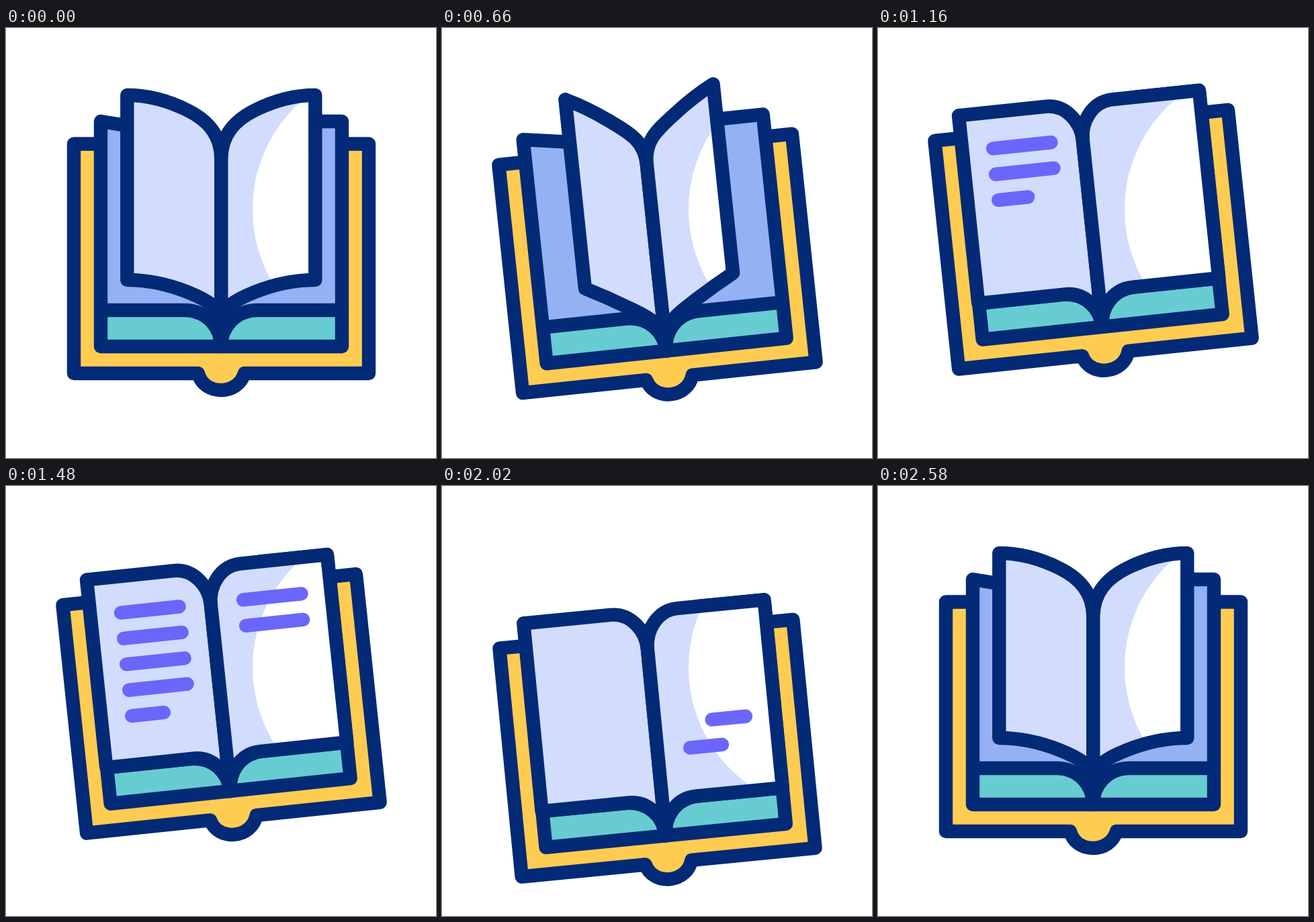
Write an HTML page with a canvas that moves like this. It is 640 px wide and 640 px high and loops after 2.62 s.

```html
<!DOCTYPE html>
<html lang="en">
<head>
<meta charset="utf-8">
<title>Open book</title>
<style>
  html, body { margin: 0; width: 100%; height: 100%; overflow: hidden; background: #fff; }
  canvas { display: block; width: 640px; height: 640px; }
</style>
</head>
<body>
<canvas id="stage" width="640" height="640"></canvas>
<script>
const ctx = document.getElementById('stage').getContext('2d');
const LOOP = 2620;
const SPINE = 320.3, MID = 343, BEND = 50;
const NAVY = '#032a76', GOLD = '#ffcc52', TEAL = '#67ccd1';
const BLUE = '#94b1f3', PAPER = '#d2dcfd', INK = '#6a66fa';

// [time, value] pairs, eased in and out between neighbours
const drop = [[150, 0], [400, 48], [900, -28.5], [1270, -28.5], [1870, 4], [2020, 47], [2420, 0]];
const tilt = [[150, 0], [420, -6], [1940, -6], [2443, 0]];

// Half page: width, then [corner y, bend y, slope at the bend, spine y] of both edges
const raised = [140, [100, 122.5, 0.5, 195], [375, 393, 0.4, 440]];
const upright = [110, [86, 124, 0.75, 195], [369, 404, 0.62, 465]];
const flat = [180, [139, 139, 0, 195], [420, 420, 0, 474]];
const poses = [[420, raised], [685, upright], [930, flat], [2060, flat], [2360, upright], [2580, raised]];

const clamp = x => Math.min(1, Math.max(0, x));
const ease = x => x * x * (3 - 2 * x);
const mix = (a, b, p) => Array.isArray(a) ? a.map((v, i) => mix(v, b[i], p)) : a + (b - a) * p;

function track(keys, t) {
  let value = keys[0][1];
  for (let i = 1; i < keys.length; i++) {
    const [t0, from] = keys[i - 1], [t1, to] = keys[i];
    if (t > t0) value = mix(from, to, ease(clamp((t - t0) / (t1 - t0))));
  }
  return value;
}

function shape(d, fill) {
  const path = new Path2D(d);
  if (fill) {
    ctx.fillStyle = fill;
    ctx.fill(path);
  }
  ctx.stroke(path);
}

function cover() {
  shape('M101 172.5H540V514H355C350 530 336 539 320 539S290 530 286 514H101Z', GOLD);
}

function backPages() {
  ctx.fillStyle = TEAL;
  ctx.fillRect(141, 400, 359, 74);
  shape('M141 139L260 158L320 200V474C320 447 300 420 265 420H141Z', BLUE);
  shape('M500 139H400L320 200V474C320 447 340 420 375 420H500Z', BLUE);
  shape('M141 420V474H500V420');
}

// Page edge from its outer corner to the spine, as seen on one side
function edge(side, width, [corner, bend, slope, end]) {
  const at = (x, y) => `${SPINE + side * x} ${y} `;
  const half = (width - BEND) / 2;
  return at(width, corner) +
    'Q' + at(BEND + half, bend - slope * half) + at(BEND, bend) +
    'C' + at(BEND * 0.4, bend + slope * BEND * 0.6) + at(0, (bend + end) / 2) + at(0, end);
}

function frontPage(side, [width, top, foot]) {
  const upper = edge(side, width, top), lower = edge(side, width, foot);
  const page = new Path2D(`M${upper}V474V${foot[3]}H${SPINE + side * width}V${foot[0]}V${top[0]}`);
  const outline = new Path2D(`M${lower}V${top[3]}M${lower}M${upper}V474M${upper}` +
    `M${SPINE + side * width} ${top[0]}V${foot[0]}`);

  // Everything above the lower edge and below the upper edge is paper
  const body = new Path2D(`M${upper}V${foot[3]}L${reversed(side, width, foot)}Z`);
  ctx.fillStyle = PAPER;
  ctx.fill(body);
  shine(body);
  ctx.stroke(outline);
}

// The same edge, drawn from the spine back to the corner
function reversed(side, width, [corner, bend, slope, end]) {
  const at = (x, y) => `${SPINE + side * x} ${y} `;
  const half = (width - BEND) / 2;
  return at(0, end) +
    'C' + at(0, (bend + end) / 2) + at(BEND * 0.4, bend + slope * BEND * 0.6) + at(BEND, bend) +
    'Q' + at(BEND + half, bend - slope * half) + at(width, corner);
}

// The highlight stays fixed on the stage while the book moves under it
function shine(clip) {
  ctx.save();
  ctx.clip(clip);
  ctx.setTransform(1, 0, 0, 1, 0, 0);
  ctx.beginPath();
  ctx.arc(582, 270, 215, 0, Math.PI * 2);
  ctx.fillStyle = '#fff';
  ctx.fill();
  ctx.restore();
}

// Ten lines typed one after another, then wiped in the same order
function textLines(t) {
  ctx.strokeStyle = INK;
  for (let i = 0; i < 10; i++) {
    const typed = clamp((t - 1000) / 70 - i);
    const wiped = clamp((t - 1760) / 31 - i);
    if (typed <= 0 || wiped >= 1) continue;
    const row = i % 5, x = i < 5 ? 186 : 369, y = 193 + 38.6 * row;
    const width = row === 4 ? 48 : 87;
    ctx.beginPath();
    ctx.moveTo(x + width * wiped, y);
    ctx.lineTo(x + width * (1 - (1 - typed) ** 2), y);
    ctx.stroke();
  }
}

function draw(t) {
  ctx.setTransform(1, 0, 0, 1, 0, 0);
  ctx.clearRect(0, 0, 640, 640);
  ctx.lineWidth = 20.4;
  ctx.lineCap = ctx.lineJoin = 'round';
  ctx.strokeStyle = NAVY;

  ctx.translate(SPINE, MID + track(drop, t));
  ctx.rotate(track(tilt, t) * Math.PI / 180);
  ctx.translate(-SPINE, -MID);

  cover();
  backPages();
  const pose = track(poses, t);
  frontPage(-1, pose);
  frontPage(1, pose);
  textLines(t);
}

const start = performance.now();
function tick() {
  draw((performance.now() - start) % LOOP);
  requestAnimationFrame(tick);
}
tick();
</script>
</body>
</html>
```
